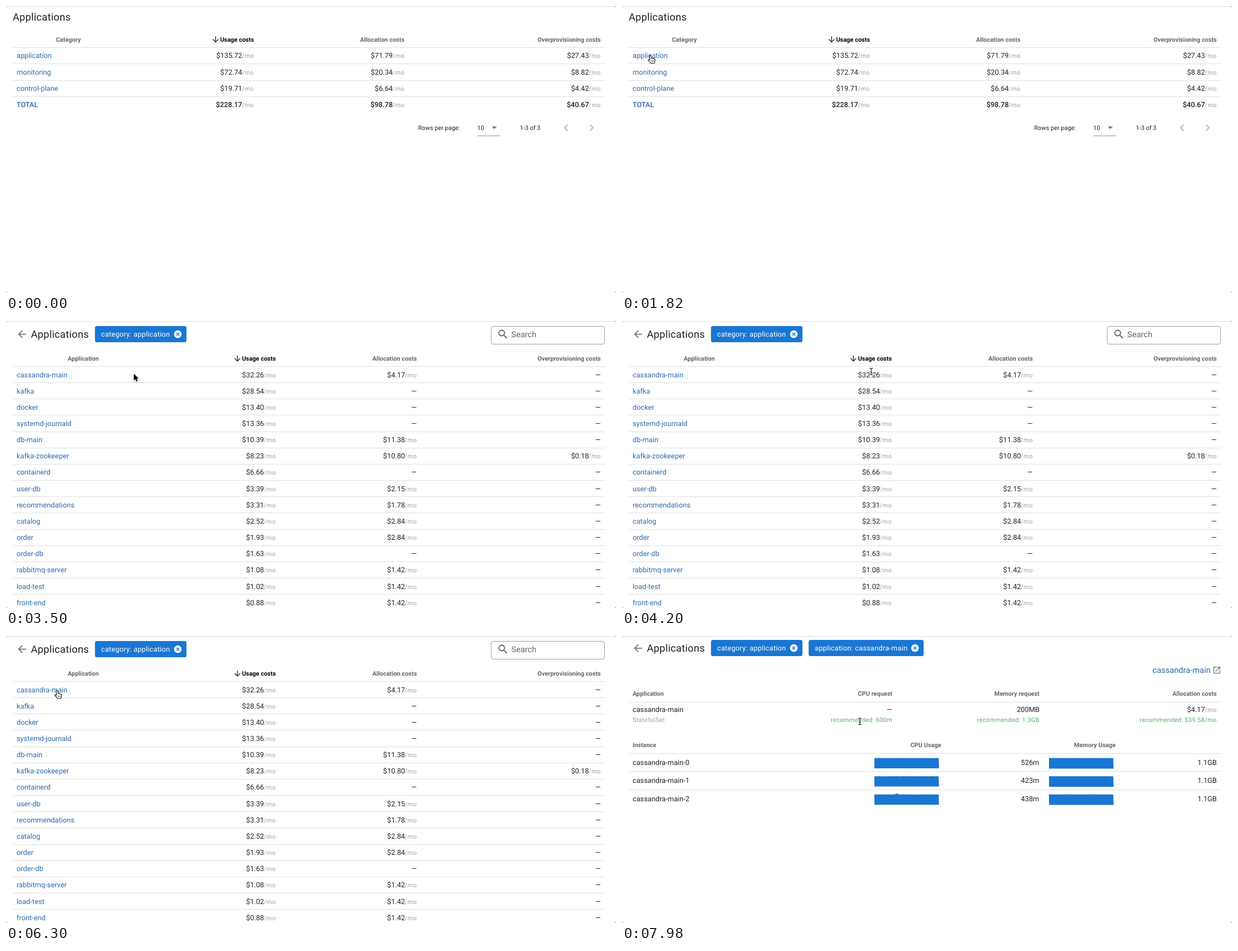
Animation of 1090x514 px, one loop 8000 ms. Source, as an HTML page with a canvas:

```html
<!DOCTYPE html>
<html lang="en">
<head>
<meta charset="utf-8">
<title>Application costs</title>
<style>
  html, body { margin: 0; width: 100%; height: 100%; overflow: hidden; background: #fff; }
  canvas { display: block; }
</style>
</head>
<body>
<canvas id="stage" width="1090" height="514"></canvas>
<script>
const ctx = document.getElementById('stage').getContext('2d');
const LOOP = 8000, STEP = 70;
const UNIT = 0.9115;
const BODY = 14 * UNIT, SMALL = 12 * UNIT, LARGE = 16 * UNIT, TITLE = 20 * UNIT;
const INK = '#212121', MUTED = '#666', GREY = '#9e9e9e', LINK = '#2c69ad',
      BLUE = '#1976d2', GREEN = '#5caa60', ICON = '#757575', RULE = '#e0e0e0';

const icons = {
  down: 'M11 4H13V16L18.5 10.5 19.92 11.92 12 19.84 4.08 11.92 5.5 10.5 11 16Z',
  back: 'M20 11V13H8L13.5 18.5 12.08 19.92 4.16 12 12.08 4.08 13.5 5.5 8 11Z',
  search: 'M9.5 3A6.5 6.5 0 0 1 14.44 13.73L14.71 14H15.5L20.5 19 19 20.5 14 15.5V14.71L13.73 14.44A6.5 6.5 0 1 1 9.5 3M9.5 5A4.5 4.5 0 1 0 9.5 14A4.5 4.5 0 1 0 9.5 5Z',
  open: 'M14 3V5H17.59L7.76 14.83 9.17 16.24 19 6.41V10H21V3M19 19H5V5H12V3H5A2 2 0 0 0 3 5V19A2 2 0 0 0 5 21H19A2 2 0 0 0 21 19V12H19Z'
};
for (const name in icons) icons[name] = new Path2D(icons[name]);

const arrowShape = new Path2D('M0 0V12L2.7 9.5 4.6 13.8 6.6 12.9 4.8 8.8H8.6Z');
const handShape = new Path2D('M-1.5 1Q-1.3-.6 0-.4Q1-.2 1.3 1L2.2 5Q3.5 4 4.5 5.4Q6 4.8 6.6 6.2Q8.3 5.8 8.5 7.6L8 11Q7.5 12.5 7 14H1Q0 11.5-3.5 8.8Q-4.2 7-2.4 6.9L-.4 8Z');
const handLines = new Path2D('M2.2 8.5V11.5M4 8.5V11.5M5.8 8.5V11.5');
const beamShape = new Path2D('M-3-6Q-.3-6 0-5Q.3-6 3-6M0-5V5M-3 6Q-.3 6 0 5Q.3 6 3 6M-1.5 1.5H1.5');

function text(str, x, y, { size = BODY, color = INK, weight = 400, align = 'left', spacing = 0 } = {}) {
  ctx.font = `${weight} ${size}px Roboto, sans-serif`;
  ctx.letterSpacing = `${size * spacing}px`;
  ctx.textRendering = 'geometricPrecision';
  ctx.textAlign = align;
  ctx.fillStyle = color;
  ctx.fillText(str, x, y);
}

const header = (str, x, y, align = 'right', color = MUTED) =>
  text(str, x, y, { size: SMALL, weight: 700, align, color });
const right = (str, x, y, weight = 400) => text(str, x, y, { align: 'right', weight });
const caption = (str, x, y, color = GREY, align = 'left') =>
  text(str, x, y, { size: SMALL, color, align, spacing: 1 / 30 });

function money(value, x, y, weight = 400) {
  if (!value) return right('—', x, y);
  caption('/mo', x, y, GREY, 'right');
  right('$' + value, x - 21, y, weight);
}

function rule(y, x0 = 12, x1 = 1070, color = RULE) {
  ctx.fillStyle = color;
  ctx.fillRect(x0, Math.round(y), x1 - x0, 1);
}

function icon(name, cx, cy, scale, color) {
  ctx.save();
  ctx.translate(cx - 12 * scale, cy - 12 * scale);
  ctx.scale(scale, scale);
  ctx.fillStyle = color;
  ctx.fill(icons[name]);
  ctx.restore();
}

function line(points, color, width) {
  ctx.beginPath();
  points.forEach(([x, y]) => ctx.lineTo(x, y));
  ctx.strokeStyle = color;
  ctx.lineWidth = width;
  ctx.stroke();
}

function box(x, y, w, h, radius) {
  ctx.beginPath();
  ctx.roundRect(x, y, w, h, radius);
}

function chip(str, x, y, w) {
  ctx.fillStyle = BLUE;
  box(x, y, w, 29, 3.6);
  ctx.fill();
  text(str, x + 11, y + 19, { color: '#fff', spacing: 1 / 56 });
  const cx = x + w - 15.5, cy = y + 14.6, r = 2.6;
  ctx.fillStyle = '#fff';
  ctx.beginPath();
  ctx.arc(cx, cy, 6.8, 0, 7);
  ctx.fill();
  line([[cx - r, cy - r], [cx + r, cy + r]], BLUE, 1.4);
  line([[cx + r, cy - r], [cx - r, cy + r]], BLUE, 1.4);
}

const pageTitle = (x, y) => text('Applications', x, y, { size: TITLE, spacing: 0.0125 });

function costHeaders(label, labelX, usageX, allocationX, arrowX, y) {
  header(label, labelX, y, 'center');
  icon('down', arrowX, y - 3.6, 0.684, INK);
  header('Usage costs', usageX, y, 'right', '#000');
  header('Allocation costs', allocationX, y);
  header('Overprovisioning costs', 1062.7, y);
}

const categories = [
  ['application', '135.72', '71.79', '27.43'],
  ['monitoring', '72.74', '20.34', '8.82'],
  ['control-plane', '19.71', '6.64', '4.42'],
  ['TOTAL', '228.17', '98.78', '40.67']
];

function drawCategories() {
  pageTitle(12, 26.3);
  costHeaders('Category', 111.5, 443, 712, 374.5, 63.6);
  categories.forEach(([name, ...costs], i) => {
    const y = 93.2 + 29.4 * i, weight = name === 'TOTAL' ? 500 : 400;
    rule(74 + 29.3 * i);
    text(name, 19, y, { color: LINK, weight });
    costs.forEach((cost, c) => money(cost, [443, 712, 1062.7][c], y, weight));
  });
  const small = { size: SMALL };
  text('Rows per page:', 736.5, 221.5, small);
  text('10', 842, 221.5, small);
  text('1-3 of 3', 918.3, 221.5, small);
  rule(232, 842, 883, '#949494');
  ctx.fillStyle = ICON;
  ctx.beginPath();
  ctx.moveTo(868, 215.7);
  ctx.lineTo(877.2, 215.7);
  ctx.lineTo(872.6, 220.3);
  ctx.fill();
  for (const [x, dir] of [[1000.5, 1], [1046.5, -1]])
    line([[x + 3 * dir, 212.6], [x - 2.4 * dir, 218], [x + 3 * dir, 223.4]], '#b8b8b8', 1.8);
}

const apps = `cassandra-main 32.26 4.17
kafka 28.54
docker 13.40
systemd-journald 13.36
db-main 10.39 11.38
kafka-zookeeper 8.23 10.80 0.18
containerd 6.66
user-db 3.39 2.15
recommendations 3.31 1.78
catalog 2.52 2.84
order 1.93 2.84
order-db 1.63
rabbitmq-server 1.08 1.42
load-test 1.02 1.42
front-end 0.88 1.42`.split('\n').map(row => row.split(' '));

function drawApps() {
  icon('back', 28.5, 23.6, UNIT, ICON);
  pageTitle(44.5, 30);
  chip('category: application', 159, 9, 163.5);
  ctx.strokeStyle = '#9b9b9b';
  ctx.lineWidth = 1;
  box(867, 9.5, 202.5, 32, 4);
  ctx.stroke();
  icon('search', 888, 23.8, UNIT, MUTED);
  text('Search', 903, 28.8, { size: LARGE, color: MUTED });
  costHeaders('Application', 138, 482, 734, 413.5, 71);
  apps.forEach(([name, usage, allocation, over], i) => {
    const y = 100.5 + 29.16 * i;
    rule(81 + 29.16 * i);
    text(name, 19, y, { color: LINK });
    money(usage, 482, y);
    money(allocation, 734, y);
    money(over, 1062.7, y);
  });
}

function usageBar(x, top, rough, bump) {
  const w = 115.5, bottom = top + 19;
  ctx.fillStyle = BLUE;
  ctx.beginPath();
  ctx.moveTo(x, bottom);
  for (let i = 0; i < w - 1; i++) {
    const noise = Math.sin(i * 1.9 + top) * Math.sin(i * 0.73 + top);
    const peak = bump ? 1.6 * Math.exp(-(((i - 40) / 3) ** 2)) : 0;
    ctx.lineTo(x + i, top + rough * (0.6 + 0.6 * noise) - peak);
  }
  ctx.lineTo(x + w - 0.7, top + 0.6);
  ctx.lineTo(x + w, bottom);
  ctx.fill();
}

function drawDetails() {
  icon('back', 28.5, 21.8, UNIT, ICON);
  pageTitle(44.5, 28.2);
  chip('category: application', 159, 7, 163.5);
  chip('application: cassandra-main', 333.5, 7, 205.5);
  text('cassandra-main', 948, 65.5, { size: LARGE, color: LINK });
  icon('open', 1062.8, 61.2, 0.684, ICON);

  header('Application', 19, 107.3, 'left');
  header('CPU request', 483, 107.3);
  header('Memory request', 746, 107.3);
  header('Allocation costs', 1062.7, 107.3);
  rule(118);
  text('cassandra-main', 19, 136);
  caption('StatefulSet', 19, 154);
  right('—', 483, 136);
  right('200MB', 746, 136);
  money('4.17', 1062.7, 136);
  caption('recommended: 600m', 483, 154, GREEN, 'right');
  caption('recommended: 1.3GB', 746, 154, GREEN, 'right');
  caption('recommended: $39.58/mo', 1062.7, 154, GREEN, 'right');

  header('Instance', 19, 199.4, 'left');
  header('CPU Usage', 570.3, 199.4);
  header('Memory Usage', 882, 199.4);
  ['526m', '423m', '438m'].forEach((cpu, i) => {
    const y = 230.8 + 32.6 * i, top = 218 + 32.6 * i;
    rule(209.6 + 32.6 * i);
    text('cassandra-main-' + i, 19, y);
    usageBar(451, top, 1, i === 2);
    right(cpu, 745.5, y);
    usageBar(763, top + 0.4, 0.25);
    right('1.1GB', 1062.7, y);
  });
}

const easeOut = power => p => 1 - (1 - p) ** power;
const easeBoth = p => p < 0.5 ? 2 * p * p : 1 - 2 * (1 - p) ** 2;
const linear = p => p;

// Each move: first step, last step, destination, easing, vertical sag.
const START = [-7, 115];
const moves = [
  [490, 1050, [50.5, 88.8], easeOut(2)],
  [2240, 2310, [70, 87], linear],
  [2800, 3290, [210, 95], easeBoth],
  [3430, 4060, [441.5, 89], easeBoth],
  [4200, 4340, [453, 94], linear],
  [4620, 5110, [727, 95], easeBoth],
  [5390, 6160, [91, 98], easeOut(5.85), 9.5],
  [7280, 7980, [425, 153], easeBoth, 10]
];
const clicks = [[1750, 50.5, 89.5], [6230, 90.5, 98]];

function pointerAt(time) {
  let from = START;
  for (const [first, last, to, ease, sag = 0] of moves) {
    if (time < first) break;
    const p = Math.min(1, (time - first + STEP) / (last - first + STEP)), e = ease(p);
    const at = [0, 1].map(k => from[k] + (to[k] - from[k]) * e);
    at[1] += sag * Math.sin(Math.PI * p);
    if (p < 1) return at;
    from = to;
  }
  return from;
}

function pointerKind(time, x, y) {
  const within = (a, b) => x >= a && x <= b;
  if (time < 1960) return within(18, 82) && y < 98 ? 'hand' : 'arrow';
  if (time < 6440) {
    if (within(19, 110) && y > 89) return 'hand';
    return within(421, 482) || within(680, 734) ? 'beam' : 'arrow';
  }
  return within(373, 483) && y > 125 ? 'beam' : 'arrow';
}

function drawPointer(time) {
  if (time < moves[0][0]) return;
  const [x, y] = pointerAt(time), kind = pointerKind(time, x, y);
  const outline = (shape, color, width) => {
    ctx.strokeStyle = color;
    ctx.lineWidth = width;
    ctx.stroke(shape);
  };
  ctx.save();
  ctx.translate(x, y);
  ctx.lineJoin = 'round';
  if (kind === 'beam') {
    outline(beamShape, 'rgba(255,255,255,.8)', 2.6);
    outline(beamShape, '#222', 1.2);
  } else if (kind === 'hand') {
    ctx.fillStyle = '#fff';
    ctx.fill(handShape);
    outline(handShape, '#111', 1.1);
    outline(handLines, '#333', 0.8);
  } else {
    ctx.shadowColor = 'rgba(0,0,0,.3)';
    ctx.shadowBlur = 2;
    ctx.shadowOffsetY = 1;
    outline(arrowShape, '#fff', 1.8);
    ctx.shadowColor = 'transparent';
    ctx.fillStyle = '#000';
    ctx.fill(arrowShape);
  }
  ctx.restore();
}

function drawClicks(time) {
  for (const [start, x, y] of clicks) {
    if (time !== start) continue;
    ctx.beginPath();
    ctx.arc(x, y, 28, 0, 7);
    ctx.strokeStyle = '#333';
    ctx.lineWidth = 2;
    ctx.stroke();
  }
}

function draw(now) {
  const time = Math.floor((now % LOOP) / STEP) * STEP;
  ctx.fillStyle = '#a8a8a8';
  ctx.fillRect(0, 0, 1090, 514);
  ctx.fillStyle = '#fff';
  box(0, 0, 1090, 514, 4);
  ctx.fill();
  rule(0, 3, 1087, '#dcdcdc');
  if (time < 1960) drawCategories();
  else if (time < 6440) drawApps();
  else drawDetails();
  drawClicks(time);
  drawPointer(time);
}

let origin;
function tick(now) {
  origin ??= now;
  draw(now - origin);
  requestAnimationFrame(tick);
}
draw(0);
requestAnimationFrame(tick);
</script>
</body>
</html>
```
